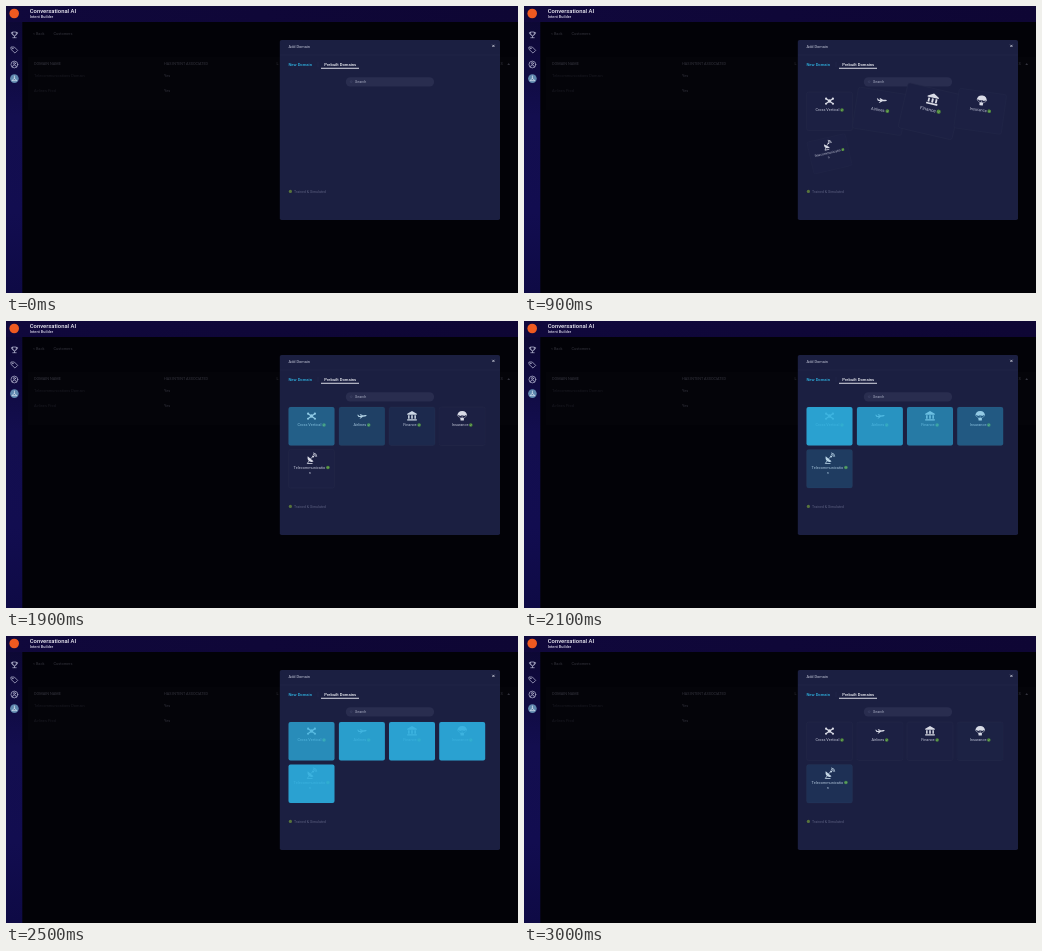
Recreate the animation shown at these times as an HTML page. Size 512x287 px, loop 3.1 s.

```html
<!DOCTYPE html>
<html lang="en">
<head>
<meta charset="utf-8">
<title>Add Domain</title>
<style>
  html, body { margin: 0; width: 100%; height: 100%; overflow: hidden; background: #020207; }
  svg { display: block; width: 100%; height: 100%; }
  text { font-family: Roboto, "Open Sans", sans-serif; font-size: 3.9px; fill: #c6c9da; }
  .title { font-size: 5.85px; font-weight: 500; fill: #f1f0f8; }
  .sub { font-size: 3.9px; font-weight: 500; fill: #d5d2e4; }
  .faint { fill: #34343e; }
  .fainter { fill: #1b1b23; }
  .tab { font-size: 4.15px; font-weight: 500; }
  .label { text-anchor: middle; font-size: 3.85px; }
  .line { fill: none; stroke: #b9bad4; stroke-width: .7; stroke-linejoin: round; stroke-linecap: round; }
</style>
</head>
<body>
<svg id="stage" viewBox="0 0 512 287" preserveAspectRatio="none">
  <defs>
    <linearGradient id="bar" x1="0" x2="0" y1="0" y2="1">
      <stop offset="0" stop-color="#0d0835"/>
      <stop offset=".35" stop-color="#130e4f"/>
      <stop offset=".7" stop-color="#120d50"/>
      <stop offset="1" stop-color="#0e0a45"/>
    </linearGradient>
    <linearGradient id="head">
      <stop offset="0" stop-color="#10083c"/>
      <stop offset="1" stop-color="#0e0634"/>
    </linearGradient>
  </defs>

  <rect width="512" height="287" fill="#020207"/>
  <rect x="22" y="51" width="490" height="53" fill="#040409"/>
  <rect width="512" height="16" fill="url(#head)"/>
  <rect y="16" width="16.3" height="271" fill="url(#bar)"/>

  <circle cx="8.2" cy="7.5" r="4.8" fill="#ef5a20"/>
  <text class="title" x="23.8" y="6.8">Conversational AI</text>
  <text class="sub" x="23.8" y="12.2">Intent Builder</text>

  <g class="line">
    <path d="M6.7 26h3.6v2.1a1.8 1.8 0 0 1-3.6 0zM6.7 26.6H5.4q0 2 1.6 2M10.3 26.6h1.3q0 2-1.6 2M8.5 30v1.6M6.8 31.7h3.4"/>
    <path d="M5.3 41h3l3.4 3.4-2.7 2.7L5.3 43.6z"/>
    <circle cx="6.8" cy="42.5" r=".25"/>
    <circle cx="8.4" cy="58.5" r="3.4"/>
    <path d="M6.3 61q.2-2 2.1-2t2.1 2"/>
    <circle cx="8.4" cy="57.4" r="1"/>
  </g>
  <circle cx="8.4" cy="72.6" r="4.3" fill="#5f87ae"/>
  <path d="M8.4 70v2.2M6.2 74.4l2.2-2.2 2.2 2.2z" class="line" style="stroke:#e4edf6"/>

  <text class="faint" x="27" y="28.7">&lt; Back</text>
  <text class="faint" x="47.5" y="28.7">Customers</text>
  <text class="faint" x="28" y="59.3">DOMAIN NAME</text>
  <text class="faint" x="158" y="59.3" style="font-size:3.75px">HAS INTENT ASSOCIATED</text>
  <text class="faint" x="270.6" y="59.3">L</text>
  <text class="faint" x="494.5" y="59.3">S</text>
  <path d="M501.3 59l1.4-2 1.4 2z" fill="#34343e"/>
  <text class="fainter" x="28" y="71.3">Telecommunications Domain</text>
  <text class="fainter" x="28" y="86.3">Airlines Prod</text>
  <text class="faint" x="158" y="71.3">Yes</text>
  <text class="faint" x="158" y="86.3">Yes</text>

  <rect x="273.8" y="34" width="220.2" height="180" rx="1.8" fill="#1b1f41"/>
  <path d="M274 49h220" stroke="#252949" stroke-width=".5"/>
  <text x="282.6" y="42.3">Add Domain</text>
  <path d="M486.3 38.8l2.2 2.2m0-2.2l-2.2 2.2" stroke="#eceef6" stroke-width=".65"/>
  <text class="tab" x="282.4" y="59.6" style="fill:#2fb4e3">New Domain</text>
  <path d="M312 56v5" stroke="#2a2f52" stroke-width=".4"/>
  <text class="tab" x="318.3" y="59.6" style="fill:#f4f5fa">Prebuilt Domains</text>
  <rect x="315" y="61.8" width="38" height=".9" fill="#eef0f7"/>
  <rect x="339.8" y="71.2" width="88.3" height="9.4" rx="4.7" fill="#292d4f"/>
  <circle cx="345.2" cy="75.7" r=".9" fill="none" stroke="#4b5072" stroke-width=".4"/>
  <text x="349" y="77.2" style="font-size:3.7px;fill:#a9adc3">Search</text>
  <circle cx="284.4" cy="185.4" r="1.6" fill="#58743c"/>
  <text x="288" y="186.8" style="font-size:3.6px;fill:#5c6080">Trained &amp; Simulated</text>
  <g id="cards"></g>
</svg>
<script>
const LOOP = 3100, STEP = 100;

const icons = {
  tools: '<path d="M-3.6-2.6L3.6 2.8M3.6-2.6L-3.6 2.8" stroke="#d9dbe6" stroke-width="1.2"/>' +
    '<circle cx="-3.4" cy="-2.3" r="1.1"/><circle cx="3.4" cy="-2.3" r="1.1"/>' +
    '<circle cx="-3.5" cy="2.7" r="1"/><circle cx="3.5" cy="2.7" r="1"/><circle r="1.7"/>',
  plane: '<path d="M-4.7-1.3l1 .1 1.1 1.1L3.5-1.1q1.4-.1 1.3.5T3.2.4L1 .8-1.4 2.5h-1L-1 1-3.4 1zM-1.2-.4L-2.2-1.7h.9L1.2-.8z"/>',
  bank: '<path d="M0-4.9L4.8-2.2v.9h-9.6v-.9zM-3.9-.7h1.5v3.4h-1.5zM-.8-.7H.8v3.4H-.8zM2.4-.7h1.5v3.4H2.4zM-4.8 3.2h9.6v1.4h-9.6z"/>',
  chute: '<path d="M-4.9-.2Q-4.5-5 0-5T4.9-.2Q3.4-1.2 2 0 0-1.3-2 0-3.4-1.2-4.9-.2z"/>' +
    '<path d="M-4.4 0L-1 2.4M4.4 0L1 2.4M0-.6v3" stroke="#d9dbe6" stroke-width=".45"/>' +
    '<rect x="-1.7" y="1.7" width="3.4" height="2.9" rx=".6"/>',
  dish: '<path d="M-3.8-2.2Q-5 2.6-.2 3.4q1.3.2 2.2-.6z"/>' +
    '<path d="M-1 .4L1.4-2M-2.6 2.6L-4.2 5H1" stroke="#d9dbe6" stroke-width=".8" fill="none"/>' +
    '<circle cx="1.6" cy="-2.1" r="1"/>' +
    '<path d="M1.6-4.2A2.4 2.4 0 0 1 3.9-1.8M1.6-5.6A3.8 3.8 0 0 1 5.2-1.8" stroke="#d9dbe6" stroke-width=".8" fill="none"/>'
};

// centre x, centre y, icon, label, badge x, overflow letter
const cards = [
  [305.5, 105.3, 'tools', 'Cross Vertical', 12.5],
  [355.9, 105.3, 'plane', 'Airlines', 6.8],
  [406, 105.3, 'bank', 'Finance', 7.1],
  [456.2, 105.3, 'chute', 'Insurance', 8.6],
  [305.5, 147.8, 'dish', 'Telecommunicatio', 16.4, 'n']
];

// age in ms, scale, angle, opacity
const popKeys = [
  [0, 0, -25, 0],
  [80, .45, -22, .5],
  [160, .85, -13, 1],
  [230, 1.04, 8, 1],
  [300, 1.2, 13, 1],
  [370, 1.08, 9, 1],
  [440, 1, 0, 1]
];

const clamp = v => Math.min(1, Math.max(0, v));
const ease = v => { const p = clamp(v); return p * p * (3 - 2 * p); };

function pop(age) {
  if (age <= 0) return popKeys[0].slice(1);
  const i = popKeys.findIndex(k => k[0] > age);
  if (i < 0) return popKeys[popKeys.length - 1].slice(1);
  const a = popKeys[i - 1], b = popKeys[i], p = (age - a[0]) / (b[0] - a[0]);
  return a.slice(1).map((v, n) => v + (b[n + 1] - v) * p);
}

const box = 'x="-23" y="-19.2" width="46" height="38.4" rx="2"';
const holder = document.getElementById('cards');
holder.innerHTML = cards.map(([, , icon, label, badge, rest]) => `<g>
  <rect ${box} fill="#1c2043" stroke="#242949" stroke-width=".5"/>
  <g transform="translate(0 -10.3)" fill="#d9dbe6">${icons[icon]}</g>
  <text class="label" x="-2.1" y="0">${label}</text>
  ${rest ? `<text class="label" x="-1.8" y="5">${rest}</text>` : ''}
  <circle cx="${badge}" cy="-1.3" r="1.75" fill="#4f8a3c"/>
  <path d="M${badge - .8}-1.3l.6.6 1-1.2" fill="none" stroke="#9cc48a" stroke-width=".4"/>
  <rect class="tint" ${box} fill="#2cb0e0"/>
</g>`).join('');
const parts = [...holder.children].map(el => ({ el, tint: el.querySelector('.tint') }));

function draw(t) {
  parts.forEach(({ el, tint }, i) => {
    const [x, y] = cards[i], lag = 70 * i;
    const [scale, angle, alpha] = pop(t - 460 - lag);
    el.setAttribute('transform', `translate(${x} ${y}) rotate(${angle}) scale(${scale})`);
    el.setAttribute('opacity', alpha);
    const glow = ease((t - 1695 - lag) / 420) - ease((t - 2390 - lag) / 425);
    tint.setAttribute('opacity', .9 * glow);
  });
}

const start = performance.now();
function tick() {
  const t = (performance.now() - start) % LOOP;
  draw(Math.floor(t / STEP) * STEP);
  requestAnimationFrame(tick);
}
tick();
</script>
</body>
</html>
```
